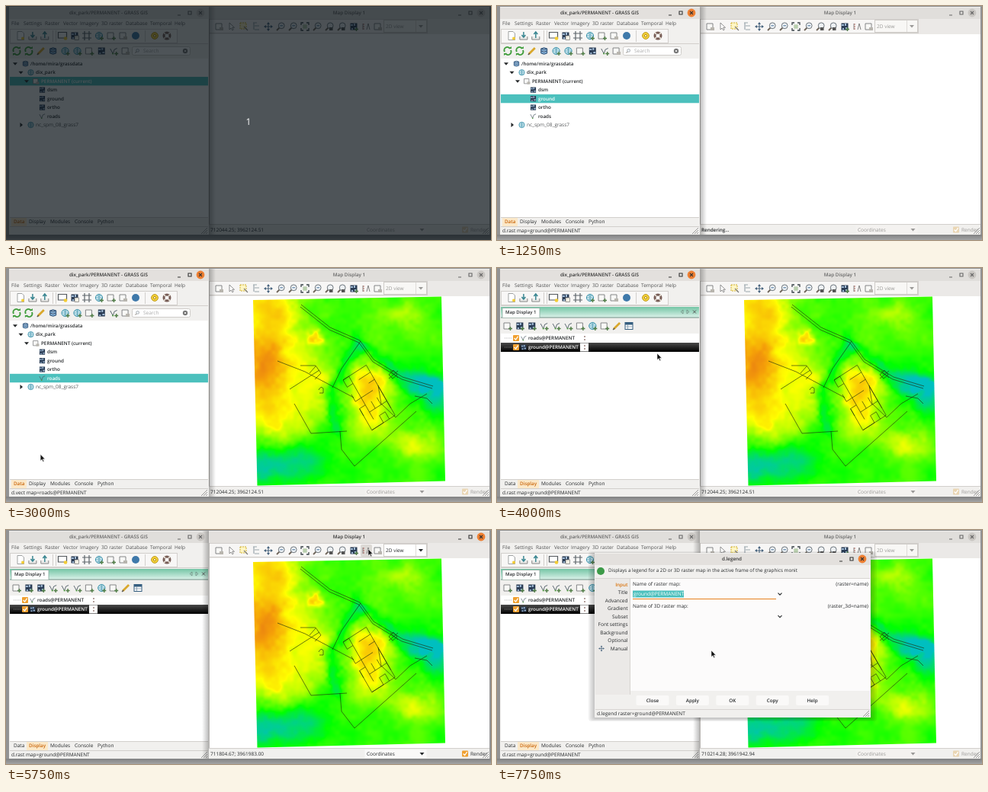
An HTML page with a canvas that plays this animation: 636 px wide and 307 px high, repeating every 8000 ms.

```html
<!DOCTYPE html>
<html lang="en">
<head>
<meta charset="utf-8">
<title>Map legend walkthrough</title>
<style>
html, body { margin: 0; width: 100%; height: 100%; overflow: hidden; background: #fff; }
canvas, svg { position: absolute; left: 0; top: 0; width: 636px; height: 307px; }
text { font-family: "Fira Sans", "Open Sans", "Noto Sans", sans-serif; text-rendering: geometricPrecision; white-space: pre; }
</style>
</head>
<body>
<canvas id="relief" width="636" height="307"></canvas>
<svg id="ui" viewBox="0 0 636 307"></svg>
<script>
const INK = '#26292b', GREY = '#9b9a98', TEAL = '#4cc0bd', ORANGE = '#e8821e', BAR = '#f1f0ee', EDGE = '#d2cfcc';
const ui = document.getElementById('ui'), relief = document.getElementById('relief');

/* ---------- drawing helpers ---------- */
const rect = (x, y, w, h, fill, more = '') => `<rect x="${x}" y="${y}" width="${w}" height="${h}" fill="${fill}" ${more}/>`;
const path = (d, stroke, fill = 'none', w = 1, more = '') => `<path d="${d}" stroke="${stroke}" fill="${fill}" stroke-width="${w}" ${more}/>`;
const disc = (x, y, r, fill, stroke = 'none', w = 1) => `<circle cx="${x}" cy="${y}" r="${r}" fill="${fill}" stroke="${stroke}" stroke-width="${w}"/>`;
const at = (x, y, s, k = 1) => `<g transform="translate(${x} ${y}) scale(${k})">${s}</g>`;
// y is the middle of the line
const text = (x, y, s, { c = INK, b = 0, a = 'start', size = b ? 6.3 : 6.5 } = {}) =>
  `<text x="${x}" y="${y + 2.3}" fill="${c}" font-size="${size}" font-weight="${b ? 600 : 400}" text-anchor="${a}">${s}</text>`;
const clamp = (v, lo = 0, hi = 1) => Math.max(lo, Math.min(hi, v));
const smooth = u => u * u * (3 - 2 * u);
const mix = (a, b, u) => a + (b - a) * u;
const hash = (i, j) => { const v = Math.sin(i * 127.1 + j * 311.7) * 43758.5453; return v - Math.floor(v); };

/* ---------- icons, centred on 0,0 ---------- */
const sheet = path('M-5 -4H3V4H-5Z', '#77797b', '#f8f8f6', .9);
const plus = path('M3.5 1V6M1 3.5H6', '#4f7d45', 'none', 1.4);
const tiles = rect(-4.5, -4.5, 9, 9, '#2b3d55') + path('M-4 -2H-1M1 -4V-1M1 2H4M-3 3H-1', '#9fb9d4', 'none', 2);
const vee = path('M-4.5 -3L-1 3.5 1 -2 4.5 -3.5', '#4d5b66', 'none', .9) + disc(-1, 3.5, 1, '#4b9a3a');
const lens = path('M-1 1L-5 5', '#6e6459', 'none', 1.8) + disc(1.2, -1.2, 3.9, '#eef2f5', '#5d666e', .9);
const globe = disc(0, 0, 4.6, '#d8eef5', '#3a91aa') + path('M-4.5 0H4.5M0 -4.5V4.5M-3 -3Q0 -1 3 -3M-3 3Q0 1 3 3', '#3a91aa', 'none', .7);
const tray = path('M-5 1V5H5V1', '#858585', '#ececea');
const cross = path('M-5 0H5M0 -5V5', '#4a657f', 'none', 1.1) + path('M-6 0L-3 -2V2ZM6 0L3 -2V2ZM0 -6L-2 -3H2ZM0 6L-2 3H2Z', 'none', '#4a657f');
const ICON = {
  doc: path('M-4 -5.5H2L4.5 -3V5.5H-4Z', '#8a8d8f', '#fff', .8) + disc(3, 3.5, 2, '#f2cc35'),
  down: tray + path('M0 -5V1M-2.5 -1L0 2 2.5 -1', '#3b8792', 'none', 1.5),
  up: tray + path('M0 3V-4M-2.5 -2L0 -5 2.5 -2', '#3b8792', 'none', 1.5),
  mon: path('M-5.5 -4.5H5.5V3H-5.5Z', '#555a5e', '#fff', 1.2) + disc(4, 3.5, 2.3, '#f2cc35'),
  calc: tiles + rect(0, 0, 5.5, 5.5, '#f3f0e4', 'stroke="#777" stroke-width=".7"'),
  frame: path('M-3 -6V6M3 -6V6M-6 -3H6M-6 3H6', '#5c646a', 'none', 1.2),
  fit: path('M-5 -2V-5H-2M2 -5H5V-2M5 2V5H2M-2 5H-5V2', '#3d454b', 'none', 1.3) + rect(-2.7, -2.7, 5.4, 5.4, '#b9cfae'),
  refresh: path('M-4 1A4 4 0 0 1 3 -3M4 -1A4 4 0 0 1 -3 3', '#3f9d3b', 'none', 2) + path('M1 -3H5V-6ZM-1 3H-5V6Z', 'none', '#3f9d3b'),
  plus: sheet + plus, page: sheet + rect(0, 1, 5, 4, '#b8b5ae'),
  dot: disc(0, 0, 5, '#3f79aa'),
  gear: disc(0, 0, 4.4, '#f3d23b', '#c09a20') + disc(0, 0, 1.6, '#fff7c8', '#b78e13'),
  buoy: disc(0, 0, 4, 'none', '#775c55', 3) + path('M-4 -4L-2 -2M4 4L2 2M4 -4L2 -2M-4 4L-2 2', '#e4ddd4', 'none', 1.8),
  pencil: path('M-4 4L4 -4', '#d9a82c', 'none', 2.8) + path('M-5 5L-3 3', '#555', 'none', 1.4),
  db: path('M-4 -3Q0 -5.5 4 -3V3Q0 5.5 -4 3ZM-4 -3Q0 -1 4 -3M-4 0Q0 2 4 0', '#24476e', '#7fa9cf', .9),
  globe, globep: globe + plus, raster: tiles, rasterp: tiles + plus, vec: vee, vecp: vee + plus,
  ptr: path('M-3 -5V4L-1 2 1 5 2.3 4 .5 1.3H3.5Z', '#777', '#fff', .8),
  select: path('M-5 -5H3V3H-5Z', '#d0b030', '#fff6c4', 1, 'stroke-dasharray="2 1"') + path('M0 0L5 5', '#777', 'none', 1.1),
  tree: path('M-4 -5H1M-2 -1H4M-2 4H4M-3 -5V4', '#9aa5ac', 'none', 1.2),
  move: cross, zoom: lens + path('M-.6 -1.2H3', '#45719a', 'none', 1), zoomp: lens + rect(0, 1, 4.5, 4, '#555'),
  elems: path('M-4 -4V4M1 4L3 -4 5 4', '#777', 'none', .9) + path('M-4 -3H-2M-4 0H-2M-4 3H-2', '#b0655d', 'none', 1.2),
  table: rect(-5, -4.5, 10, 9, '#fff', 'stroke="#365f80"') + rect(-5, -4.5, 10, 3, '#365f80') + path('M-5 1H5M-1.5 -2V4', '#7994a8', 'none', .8),
};
const icons = (x, y, names, step = 15.9) => names.split(' ').map((n, i) => at(x + i * step, y, ICON[n])).join('');
const check = (x, y, on) => rect(x - 4, y - 4, 8, 8, on ? '#f0a030' : '#ead6b4', 'rx="1"') + path(`M${x - 2.4} ${y}l2 2 3-4.4`, '#fff', 'none', 1.3);
const grip = (x, y) => path(`M${x - 8} ${y}l8-8M${x - 5} ${y}l5-5M${x - 2} ${y}l2-2`, '#858585', 'none', .8);
const chevron = (x, y) => path(`M${x - 2.5} ${y - 1.3}l2.5 2.5 2.5-2.5`, INK, 'none', 1.1);
const drop = (x, y, c) => path(`M${x - 3} ${y - 1.5}h6l-3 3.5z`, 'none', c);

function titleBar(x, y, w, name, mid, on) {
  const c = on ? '#333' : '#666', e = x + w - 11;
  return rect(x, y, w, 16, on ? '#e3e0dd' : '#e0dedb') + path(`M${x} ${y + .5}h${w}`, '#f2f1ef') +
    text(mid, y + 8, name, { b: 1, a: 'middle', c }) +
    path(`M${e - 30} ${y + 11}h4M${e - 16} ${y + 6}h4v4h-4z`, c, 'none', 1.1) +
    disc(e, y + 8, 5.4, on ? '#ee7f32' : '#c9c6c2') + path(`M${e - 2} ${y + 6}l4 4m0-4l-4 4`, c, 'none', 1.1);
}

/* ---------- left window ---------- */
const MENU = { File: 7, Settings: 23, Raster: 51, Vector: 75, Imagery: 97, '3D raster': 125, Database: 157, Temporal: 189, Help: 221 };
const TABS = { Data: 10, Display: 30, Modules: 58, Console: 90, Python: 120 };
const ROWS = [['/home/mira/grassdata', 32, 'db'], ['dix_park', 39, 'globe'], ['PERMANENT (current)', 46, 'page'], ['dsm', 54, 'raster'],
  ['ground', 54, 'raster'], ['ortho', 54, 'raster'], ['roads', 54, 'vec'], ['nc_spm_08_grass7', 39, 'globe']];

function dataTab(sel) {
  let s = icons(14, 59, 'refresh refresh pencil db globep globep plus raster vecp page') +
    rect(165.5, 53.5, 76, 11, '#fff', 'rx="2" stroke="#cfccc9"') + at(172, 59, lens, .5) + text(180, 59, 'Search', { c: '#aaa' }) +
    disc(235, 59, 3.2, '#777') + path('M233.8 57.8l2.4 2.4m0-2.4l-2.4 2.4', '#fff', 'none', .8) + rect(5, 69, 260, 208, '#fff');
  ROWS.forEach(([name, x, ic], i) => {
    const y = 75.7 + i * 11.47, on = i === sel;
    if (on) s += rect(5, y - 5.7, 260, 11.4, TEAL);
    s += at(x - 6.5, y, ICON[ic], .8) + text(x, y, name, { b: i < 7, c: on ? '#fff' : i < 7 ? INK : '#55585a' });
    if (i < 3) s += drop(12 + i * 7.5, y, INK);
    if (i === 7) s += path(`M18.5 ${y - 3}v6l3.5-3z`, 'none', INK);
  });
  return s;
}

function displayTab(sel) {
  let s = rect(5, 51, 260, 14, 'url(#strip)') + path('M5 65H265', '#6f8f84') +
    path('M7 65V52.5H56V65', '#8aa79c', '#fff', .8) + text(11, 57.7, 'Map Display 1', { b: 1, size: 6 }) +
    path('M244 55v5l-3-2.5zM249 55v5l3-2.5z', '#688078', 'none', .7) + path('M257 55.5l4 4m0-4l-4 4', '#555') +
    icons(14, 76, 'plus rasterp rasterp vecp vecp vecp plus globep plus pencil table') + rect(5, 86, 260, 191, '#fff');
  ['roads', 'ground'].forEach((name, i) => {
    const y = 92 + i * 12, on = i === sel;
    if (on) s += rect(5, y - 6, 260, 12, 'url(#dark)');
    s += path(`M10 ${y}h10`, '#999', 'none', .7, 'stroke-dasharray="1 1"') + check(25, y, 1) +
      at(35, y, i ? tiles : vee, .75) + text(41, y, name + '@PERMANENT', { b: 1, c: on ? '#fff' : INK }) +
      rect(109, y - 5.5, 11, 11, '#fff') + path(`M115 ${y - 3}v2M115 ${y + 1}v2`, '#8d6d68', 'none', 1.3);
  });
  return s;
}

function mainWindow(s) {
  let o = rect(4, 17, 262, 283, BAR) + titleBar(4, 1, 262, 'dix_park/PERMANENT - GRASS GIS', 134.5, s.focus === 'main');
  for (const m in MENU) o += text(MENU[m], 22.5, m, { c: '#505152' });
  o += rect(5.5, 30.5, 219, 18, '#f8f7f6', `stroke="${EDGE}"`) + icons(19, 39, 'doc down up') + icons(74, 39, 'mon calc frame globep plus page dot', 16) +
    icons(195, 39, 'gear buoy', 16) + path('M61.5 32V47M65.5 32V47M182.5 32V47M5 49.5H265', EDGE);
  o += s.tab === 'Data' ? dataTab(s.row) : displayTab(s.layer);
  o += path('M5 277.5H265M5 289.5H265', EDGE);
  for (const k in TABS) {
    const on = k === s.tab;
    if (on) o += rect(TABS[k] - 3, 278, k === 'Data' ? 20 : 28, 11, '#fbe8c8');
    o += text(TABS[k], 283, k, { b: on, c: on ? '#c9650a' : INK });
  }
  return o + text(7, 295, s.cmd) + grip(264, 299);
}

/* ---------- roads: a few bends, a random street grid ---------- */
const HIGHWAY = [[387, 48], [425, 78], [464, 95], [482, 120], [520, 143], [560, 155]];
const VALLEY = [[465, 96], [440, 132], [428, 157]];
const line = (pts, dx = 0, dy = 0) => 'M' + pts.map(([x, y]) => `${x + dx} ${y + dy}`).join('L');
// campus grid point: column i runs north-east, row j south-east
const corner = (i, j) => [442 + 7.6 * i + 5.4 * j, 147 - 4.9 * i + 9.4 * j];

function streets() {
  let d = line([corner(0, 0), corner(4, 0), corner(4, 7), corner(0, 7), corner(0, 4)]);
  for (let i = 0; i <= 4; i++) for (let j = 0; j <= 7; j++) {
    if (j < 7 && hash(i, j) < .5) d += line([corner(i, j), corner(i, j + 1)]);
    if (i < 4 && hash(j + 9, i) < .5) d += line([corner(i, j), corner(i + 1, j)]);
  }
  return d;
}
const ROADS = line(HIGHWAY) + line(HIGHWAY, -1, 3) + line(VALLEY) + streets() +
  'M356 122L392 136 456 170M372 159L411 134M386 128H406L413 138 405 146M398 138L406 129M410 160q3-6 6-2v6h-5' +
  'M378 178L400 217 447 214M438 214L440 238 457 260 538 188M488 154L492 178 511 196 530 178 552 165M536 168L552 171 559 178' +
  'M502 140l6-6 5 6-6 5zM502 145l12-10M504 135l10 9';

/* ---------- map window ---------- */
function mapWindow(s) {
  const on = s.focus === 'map', c = on ? INK : GREY;
  let o = titleBar(266, 1, 368, 'Map Display 1', 450, on) + rect(266, 17, 368, 20, '#ebe9e7') +
    rect(266.5, 17.5, 286, 18, '#f7f6f5', `stroke="${EDGE}"`);
  if (s.hover) o += rect(465, 19, 15, 16, '#dcd9d5', 'rx="2"');
  o += icons(280, 27, 'page ptr select tree move zoom zoom fit zoom zoomp zoomp rasterp elems page', 16) +
    rect(495.5, 18.5, 56, 16, on ? '#fff' : '#f8f7f5', 'stroke="#cfccc8"') + path('M537.5 19V34', '#dedbd8') + text(498, 26.5, '2D view', { c }) + drop(544, 26.5, c);
  if (s.roads) o += path(ROADS, '#20300f', 'none', .65, 'stroke-linejoin="round"');
  return o + path('M266.5 17V300', '#bbb8b5') + rect(266, 286, 368, 14, BAR) + path('M266 286.5H634', EDGE) +
    text(268, 293.5, s.info, { b: s.info[0] === 'R' }) +
    rect(470.5, 288, 81, 11, on ? '#faf9f8' : '#f4f2f0') + text(473, 293.5, 'Coordinates', { c }) + drop(545.5, 293.5, c) +
    check(602, 293.5, on) + text(609, 293.5, 'Render', { c }) + grip(633, 299);
}

/* ---------- legend dialog ---------- */
const PAGES = ['Input', 'Title', 'Advanced', 'Gradient', 'Subset', 'Font settings', 'Background', 'Optional', 'Manual'];
const BUTTONS = ['Close', 'Apply', 'OK', 'Copy', 'Help'];

function dialog(on) {
  let o = '';
  for (let i = 1; i < 5; i++) o += rect(128 - i * 2, 32 - i, 362 + i * 4, 215 + i * 2, '#000', 'opacity=".06" rx="4"');
  o += rect(128, 46, 362, 200, BAR) + titleBar(128, 30, 362, 'd.legend', 308, on) +
    disc(136, 54, 5, '#3c9a48') + text(146, 53, 'Displays a legend for a 2D or 3D raster map in the active frame of the graphics monit', { size: 6.3 }) +
    rect(129, 64, 46, 152, '#ebe9e7') + rect(175, 64, 314, 147, '#fcfbfb') + path('M129 63.5H489M174.5 64V216M129 235.5H489', EDGE, 'none', .8);
  PAGES.forEach((p, i) => o += text(171.5, 71.5 + i * 10.5, p, { a: 'end', b: !i, c: i ? INK : '#d9720c' }));
  o += at(137, 155.5, cross, .65);
  if (on) o += rect(178, 79.5, 67, 9, TEAL) + rect(178, 90, 188, 1, ORANGE);
  o += text(178, 70.5, 'Name of raster map:') + text(487, 70.5, '(raster=name)', { a: 'end' }) +
    text(179, 84, 'ground@PERMANENT', { c: on ? '#fff' : GREY }) + chevron(371, 84) +
    text(178, 100, 'Name of 3D raster map:') + text(487, 100, '(raster_3d=name)', { a: 'end' }) + chevron(371, 113.5);
  BUTTONS.forEach((b, i) => {
    const x = 204 + i * 52.4;
    o += rect(x - 21.5, 217, 43, 13, '#faf9f8', 'rx="2"') + text(x, 223.5, b, { b: 1, a: 'middle', c: on ? INK : GREY });
  });
  return o + text(131, 240.8, 'd.legend raster=ground@PERMANENT') + grip(488, 245);
}

/* ---------- timeline ---------- */
// pointer moves: from, until, goal
const MOVES = [[1500, 2000, 57, 143], [2500, 3250, 41, 280], [3250, 4000, 210, 112], [4000, 5000, 475, 25],
  [5750, 6750, 264, 39], [6750, 7250, 219, 98], [7500, 7750, 281, 158]];

function pointer(t) {
  let x = 62, y = 121;
  for (const [from, until, gx, gy] of MOVES) {
    const u = smooth(clamp((t - from) / (until - from)));
    x = mix(x, gx, u);
    y = mix(y, gy, u);
  }
  return [x, y];
}

function position(t, [x, y]) {
  if (t === 1250 || t === 2250) return 'Rendering...';
  if (t < 4500) return '712044.25; 3962124.51';
  if (t >= 5000 && t < 6250) return '711804.67; 3961983.00';
  if (t >= 6750) return '710214.28; 3961942.94';
  return (710214.28 + 8.5 * (x - 266)).toFixed(2) + '; ' + (3961983 - 8.5 * (y - 38)).toFixed(2);
}

const fade = (id, dir, a, b) => `<linearGradient id="${id}" x2="${dir === 'x' ? 1 : 0}" y2="${dir === 'y' ? 1 : 0}"><stop stop-color="${a}"/><stop offset="1" stop-color="${b}"/></linearGradient>`;
const DEFS = '<defs>' + fade('strip', 'y', '#74c5a5', '#dcf2ea') + fade('dark', 'y', '#4a4a4a', '#000') + fade('desk', 'y', '#808182', '#a3a4a5') +
  fade('castR', 'x', '#0004', '#0000') + fade('castL', 'x', '#0000', '#0004') + '<clipPath id="left"><path d="M0 0H266V307H0Z"/></clipPath></defs>';
const DESK = rect(0, 0, 636, 1, '#8c8d8e') + rect(0, 0, 4, 307, '#929394') + rect(634, 0, 2, 307, '#929394') + rect(0, 300, 636, 7, 'url(#desk)');
const ARROWS = 'M-4 0H4M-2 -2L-4 0 -2 2M2 -2L4 0 2 2';

function draw(t) {
  const p = pointer(t), front = t >= 7250;
  const s = {
    focus: t < 250 ? '' : t < 5500 ? 'main' : front ? 'dialog' : 'map',
    tab: t < 3250 ? 'Data' : 'Display',
    row: t < 1000 ? 2 : t < 2000 ? 4 : 6,
    layer: t < 4000 ? 0 : 1,
    cmd: t < 1250 ? '' : t >= 2250 && t < 4000 ? 'd.vect map=roads@PERMANENT' : 'd.rast map=ground@PERMANENT',
    roads: t >= 2500, hover: t >= 5000 && t < 6250, info: position(t, p),
  };
  relief.style.visibility = t >= 1500 ? 'visible' : 'hidden';
  let o = DEFS + DESK + mainWindow(s);
  if (t >= 6250 && !front) o += `<g clip-path="url(#left)">${dialog(false)}</g>`;
  o += mapWindow(s) + (t < 5500 ? rect(266, 1, 9, 299, 'url(#castR)') : rect(257, 1, 9, 299, 'url(#castL)'));
  if (front) o += dialog(true);
  if (t === 5250) o += rect(440.5, 37.5, 62, 13, '#fdfdfc', 'rx="2" stroke="#c9c6c3"') + text(471.5, 44, 'Add map elements', { a: 'middle' });
  if (t === 6750) o += at(...p, path(ARROWS, '#fff', 'none', 2.4) + path(ARROWS, '#111'));
  else if (t >= 1500) o += at(...p, path('M0 0V8.5L2 6.7 3.4 9.8 4.7 9.2 3.3 6.2H6Z', '#fff', '#111', .5));
  if (t < 250) o += rect(0, 0, 636, 307, '#0b1218', 'opacity=".72"') + text(318, 153.5, '1', { a: 'middle', c: '#fff', size: 12 });
  ui.innerHTML = o;
}

/* ---------- terrain: hills and basins (x, y, half widths, rise), streams, noise ---------- */
const HILLS = [[338, 125, 42, 62, .55], [350, 45, 45, 28, .25], [350, 197, 42, 28, .2], [404, 89, 8, 8, .28], [405, 150, 26, 45, .24],
  [478, 165, 30, 48, .42], [522, 60, 30, 18, .18], [533, 228, 28, 20, .22], [345, 262, 50, 20, -.32], [400, 252, 26, 24, -.16], [566, 168, 26, 24, -.28]];
const RAMP = [[0, 0, 191, 191], [.3, 0, 255, 0], [.64, 255, 255, 0], [.86, 245, 160, 8], [1, 228, 112, 22]];

function noise(x, y) {
  const i = Math.floor(x), j = Math.floor(y), u = smooth(x - i), v = smooth(y - j);
  return mix(mix(hash(i, j), hash(i + 1, j), u), mix(hash(i, j + 1), hash(i + 1, j + 1), u), v) - .5;
}

function gap(x, y, pts) {
  let best = 1e9;
  for (let i = 1; i < pts.length; i++) {
    const [ax, ay] = pts[i - 1], dx = pts[i][0] - ax, dy = pts[i][1] - ay;
    const u = clamp(((x - ax) * dx + (y - ay) * dy) / (dx * dx + dy * dy));
    best = Math.min(best, Math.hypot(x - ax - u * dx, y - ay - u * dy));
  }
  return best;
}

function height(x, y) {
  const wx = x + 12 * noise(x / 16, y / 16) + 5 * noise(x / 5, y / 5), wy = y + 12 * noise(y / 16 + 40, x / 16) + 5 * noise(y / 5, x / 5 + 70);
  let h = .37 + .1 * noise(x / 30 + 7, y / 30) + .04 * noise(x / 7, y / 7);
  for (const [px, py, rx, ry, rise] of HILLS) h += rise * Math.exp(-(((wx - px) / rx) ** 2) - ((wy - py) / ry) ** 2);
  const cut = (pts, w) => Math.exp(-((gap(wx, wy, pts) / w) ** 2));
  return h - (.06 + .22 * clamp((x - 450) / 50)) * cut(HIGHWAY, 12) - .18 * cut([...VALLEY, [433, 212]], 9);
}

function paintRelief() {
  const g = relief.getContext('2d'), x0 = 322, y0 = 35, w = 256, h = 252, img = g.createImageData(w, h);
  for (let j = 0; j < h; j++) for (let i = 0; i < w; i++) {
    const v = clamp(height(x0 + i, y0 + j), 0, .999), k = RAMP.findIndex(c => c[0] > v);
    const a = RAMP[k - 1], b = RAMP[k], u = (v - a[0]) / (b[0] - a[0]), q = (j * w + i) * 4;
    for (let c = 0; c < 3; c++) img.data[q + c] = mix(a[c + 1], b[c + 1], u);
    img.data[q + 3] = 255;
  }
  g.putImageData(img, x0, y0);
  g.globalCompositeOperation = 'destination-in';
  g.beginPath();
  [[324, 42], [571, 37.5], [576, 279.5], [329.5, 285.5]].forEach(c => g.lineTo(...c));
  g.fill();
}

paintRelief();
const start = performance.now();
let shown = -1;
function tick() {
  const t = Math.floor((performance.now() - start) % 8000 / 250) * 250;
  if (t !== shown) draw(shown = t);
  requestAnimationFrame(tick);
}
tick();
</script>
</body>
</html>
```
